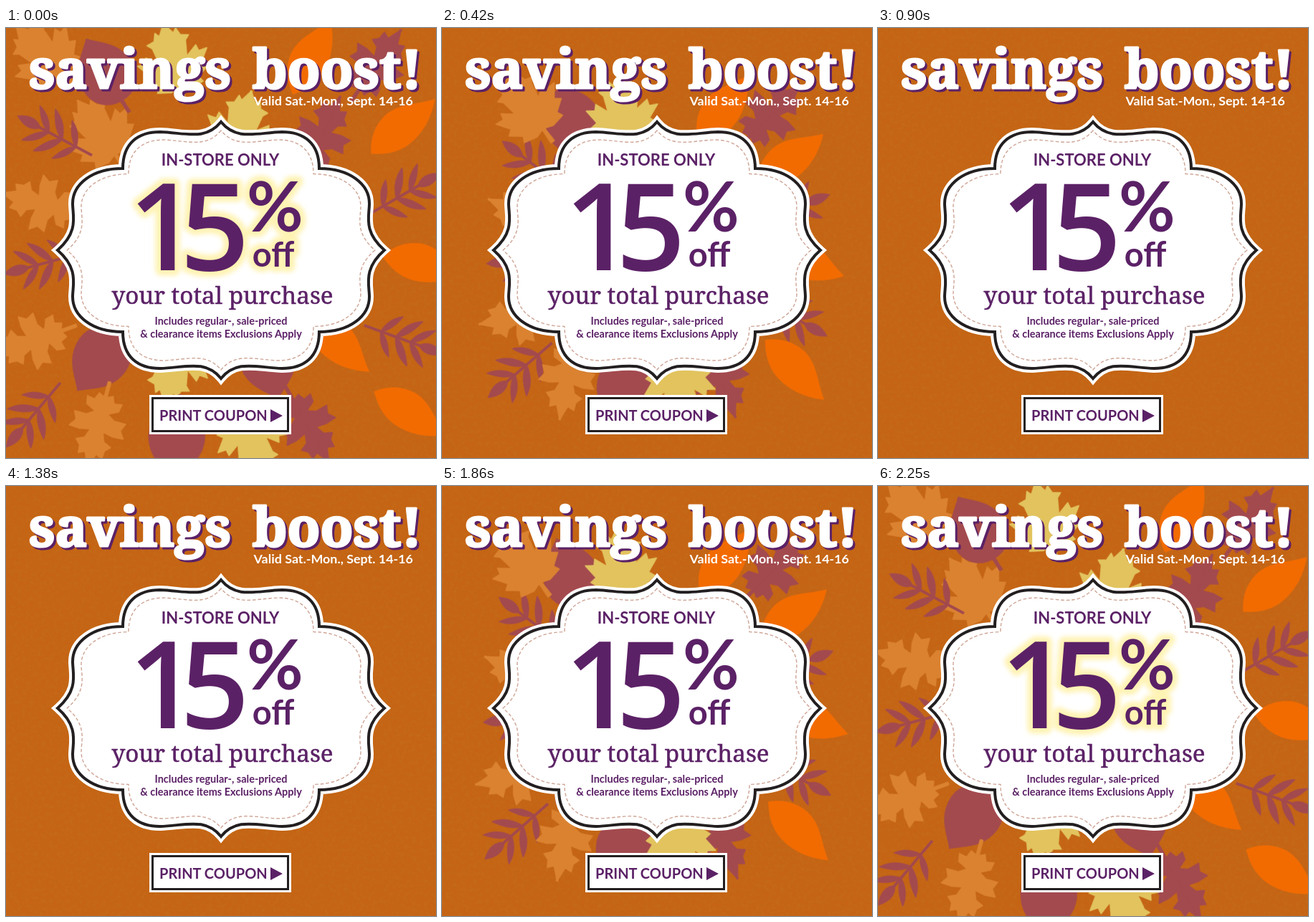
Write an HTML page without scripts that moves like this. It is 600 by 600 pixels and loops after 2.65 s.

```html
<!DOCTYPE html>
<html lang="en">
<head>
<meta charset="utf-8">
<title>Savings boost</title>
<style>
html, body { margin: 0; width: 100%; height: 100%; overflow: hidden; background: #c46414; }
svg { display: block; position: absolute; inset: 0; width: 100%; height: 100%; fill: #5b2166; }
text { font-family: Lato, "Open Sans", sans-serif; font-weight: 700; }
.mid { text-anchor: middle; }
.head { font: 700 75px "Noto Serif", serif; text-anchor: middle; }
.slab { font: 400 33.2px "Noto Serif", serif; stroke: #5b2166; stroke-width: .5; }
.num { font: 600 169px "Open Sans", sans-serif; }
.shade, .face { stroke-width: 3; stroke-linejoin: round; }
.shade { stroke: #5b2166; }
.face { fill: #fff; stroke: #fff; }

.mauve { fill: #a34a4e; stroke: #a34a4e; }
.tan { fill: #da8230; stroke: #da8230; }
.gold { fill: #e2c35e; stroke: #e2c35e; }
.fire { fill: #f26b00; stroke: #f26b00; }

/* Every leaf slides toward the badge centre, --k is how much of its distance remains */
.leaves > use {
  --k: .42; --d: 20deg;
  stroke-width: 1.5; stroke-linejoin: round;
  animation: gather 2650ms infinite steps(30);
}
.leaves > .near { --k: .1; }
@keyframes gather {
  0%, 84.906%, 100% { transform: translate(var(--x), var(--y)) rotate(var(--r)); }
  33.962%, 50.943% {
    transform: translate(
      calc(300px + var(--k) * (var(--x) - 300px)),
      calc(310px + var(--k) * (var(--y) - 310px)))
      rotate(calc(var(--r) + var(--d)));
  }
}
/* The last stretch is quicker, so all tips end up behind the badge */
.leaves { transform-origin: 300px 310px; animation: tuck 2650ms infinite steps(8); }
@keyframes tuck {
  0%, 24.906%, 60%, 100% { transform: scale(1); }
  33.962%, 50.943% { transform: scale(.82); }
}
.glow {
  fill: #fff3b4; stroke: #fff3b4; stroke-width: 15; stroke-linejoin: round;
  filter: url(#soft);
  animation: glow 2650ms infinite steps(6);
}
@keyframes glow {
  0%, 84.906%, 100% { opacity: 1; }
  6.792%, 78.113% { opacity: 0; }
}
</style>
</head>
<body>
<svg viewBox="0 0 600 600">
  <defs>
    <filter id="grain" x="0" y="0" width="100%" height="100%">
      <feTurbulence type="fractalNoise" baseFrequency=".18" numOctaves="4" seed="7"/>
      <feColorMatrix values="0 0 0 0 .55  0 0 0 0 .25  0 0 0 0 .03  .9 0 0 0 -.38"/>
    </filter>
    <filter id="soft" x="-20%" y="-20%" width="140%" height="140%"><feGaussianBlur stdDeviation="3"/></filter>
  </defs>
  <rect width="600" height="600" fill="#c46414"/>
  <rect width="600" height="600" filter="url(#grain)" opacity=".45"/>
</svg>
<svg viewBox="0 0 600 600">
  <defs>
    <path id="oakHalf" d="M-1 64L2 64 2 42 10 46 14 36 25 38 23 27 9 20 20 13 37 13 32 2 39 -8 24 -9 9 -6 14 -19 25 -24 18 -31 17 -42 8 -38 0 -58 -1 -58Z"/>
    <g id="oak"><use href="#oakHalf"/><use href="#oakHalf" transform="scale(-1 1)"/></g>
    <path id="mapleHalf" d="M-1 58L3 58 2 36 14 40 33 36 29 28 45 16 37 10 50 -8 38 -7 36 -16 20 -4 24 -26 30 -32 19 -35 15 -46 10 -40 0 -56 -1 -56Z"/>
    <g id="maple"><use href="#mapleHalf"/><use href="#mapleHalf" transform="scale(-1 1)"/></g>
    <path id="blade" d="M0 0Q11 -11 38 -10Q22 4 0 0Z"/>
    <g id="sprigHalf">
      <path d="M-1 -25L1 -25 1 58 -1 58Z"/>
      <use href="#blade" transform="translate(0 34) rotate(-22) scale(.95)"/>
      <use href="#blade" transform="translate(0 12) rotate(-26) scale(1.1)"/>
      <use href="#blade" transform="translate(0 -9) rotate(-32)"/>
      <path d="M-1 -22Q14 -36 0 -58Z"/>
    </g>
    <g id="sprig"><use href="#sprigHalf"/><use href="#sprigHalf" transform="scale(-1 1)"/></g>
    <path id="oval" d="M0 -56C12 -42 38 -30 39 4C39 28 22 42 2 43L3 62 -1 62 -2 43C-22 42 -39 28 -39 4C-38 -30 -12 -42 0 -56Z"/>
    <path id="plain" d="M3 -60C18 -40 27 -18 25 8C23 28 13 42 0 55C-14 44 -25 28 -26 6C-26 -20 -8 -36 3 -60Z"/>
    <path id="frame" d="M300 131C278 158 250 146 215 145C185 145 163 160 163 196C120 196 93 218 93 245C93 262 102 284 72 310C102 336 93 358 93 375C93 402 120 424 163 424C163 460 185 475 215 475C250 474 278 462 300 489C322 462 350 474 385 475C415 475 437 460 437 424C480 424 507 402 507 375C507 358 498 336 528 310C498 284 507 262 507 245C507 218 480 196 437 196C437 160 415 145 385 145C350 146 322 158 300 131Z"/>
    <g id="words">
      <text class="head" x="173" y="84">savings</text>
      <text class="head" x="462" y="84">boost!</text>
    </g>
    <g id="offer">
      <text class="num" x="171 243" y="338">15</text>
      <text x="336" y="284" font-size="96">%</text>
      <text class="mid" x="373" y="333" font-size="47">off</text>
    </g>
  </defs>

  <g class="leaves">
    <use href="#maple" class="tan near" style="--x:132px;--y:147px;--r:-35deg"/>
    <use href="#maple" class="gold near" style="--x:328px;--y:142px;--r:15deg"/>
    <use href="#oak" class="mauve near" style="--x:442px;--y:148px;--r:25deg"/>
    <use href="#plain" class="fire near" style="--x:462px;--y:438px;--r:130deg"/>
    <use href="#oval" class="mauve near" style="--x:365px;--y:463px;--r:165deg"/>
    <use href="#maple" class="gold near" style="--x:235px;--y:468px;--r:195deg"/>
    <use href="#oval" class="mauve near" style="--x:132px;--y:460px;--r:215deg"/>

    <use href="#sprig" class="mauve" style="--x:68px;--y:150px;--r:-62deg"/>
    <use href="#sprig" class="mauve" style="--x:54px;--y:328px;--r:-105deg"/>
    <use href="#sprig" class="mauve" style="--x:38px;--y:540px;--r:-140deg"/>
    <use href="#sprig" class="mauve" style="--x:555px;--y:232px;--r:60deg"/>
    <use href="#sprig" class="mauve" style="--x:555px;--y:435px;--r:110deg"/>
    <use href="#oval" class="mauve" style="--x:140px;--y:64px;--r:-30deg"/>
    <use href="#oval" class="mauve" style="--x:238px;--y:574px;--r:185deg"/>
    <use href="#oak" class="mauve" style="--x:518px;--y:50px;--r:35deg"/>
    <use href="#oak" class="mauve" style="--x:422px;--y:556px;--r:150deg"/>
    <use href="#maple" class="tan" style="--x:54px;--y:38px;--r:-45deg"/>
    <use href="#oak" class="tan" style="--x:50px;--y:245px;--r:-75deg"/>
    <use href="#oak" class="tan" style="--x:38px;--y:437px;--r:-110deg"/>
    <use href="#oak" class="tan" style="--x:128px;--y:556px;--r:195deg;--d:-10deg"/>
    <use href="#maple" class="gold" style="--x:234px;--y:48px;--r:-15deg"/>
    <use href="#maple" class="gold" style="--x:342px;--y:572px;--r:165deg"/>
    <use href="#plain" class="fire" style="--x:424px;--y:42px;--r:25deg"/>
    <use href="#plain" class="fire" style="--x:551px;--y:138px;--r:48deg;--d:5deg"/>
    <use href="#plain" class="fire" style="--x:580px;--y:328px;--r:100deg"/>
    <use href="#plain" class="fire" style="--x:562px;--y:535px;--r:120deg;--d:30deg"/>
  </g>

  <use href="#frame" fill="#fff" stroke="#fff" stroke-width="12"/>
  <use href="#frame" fill="#fff" stroke="#231f20" stroke-width="4"/>
  <g transform="translate(300 310) scale(.942 .933) translate(-300 -310)">
    <use href="#frame" fill="none" stroke="#cfa596" stroke-width="1.5" stroke-dasharray="5 3"/>
  </g>

  <use href="#words" class="shade" x="3" y="3"/>
  <use href="#words" class="face"/>
  <text x="568" y="108" font-size="17.9" text-anchor="end" fill="#fff">Valid Sat.-Mon., Sept. 14-16</text>

  <text class="mid" x="299" y="192" font-size="22">IN-STORE ONLY</text>
  <use href="#offer" class="glow"/>
  <use href="#offer"/>
  <text class="slab mid" x="302" y="385">your total purchase</text>
  <text class="mid" x="300" y="414" font-size="14.5">Includes regular-, sale-priced</text>
  <text class="mid" x="300" y="432" font-size="14.5">&amp; clearance items Exclusions Apply</text>

  <rect x="200" y="512" width="198" height="55" fill="#fff"/>
  <rect x="204.5" y="516.5" width="189" height="46" fill="none" stroke="#231f20" stroke-width="3"/>
  <text x="214" y="548" font-size="20">PRINT COUPON</text>
  <path d="M369 532L386 541 369 550Z"/>
</svg>
</body>
</html>
```
